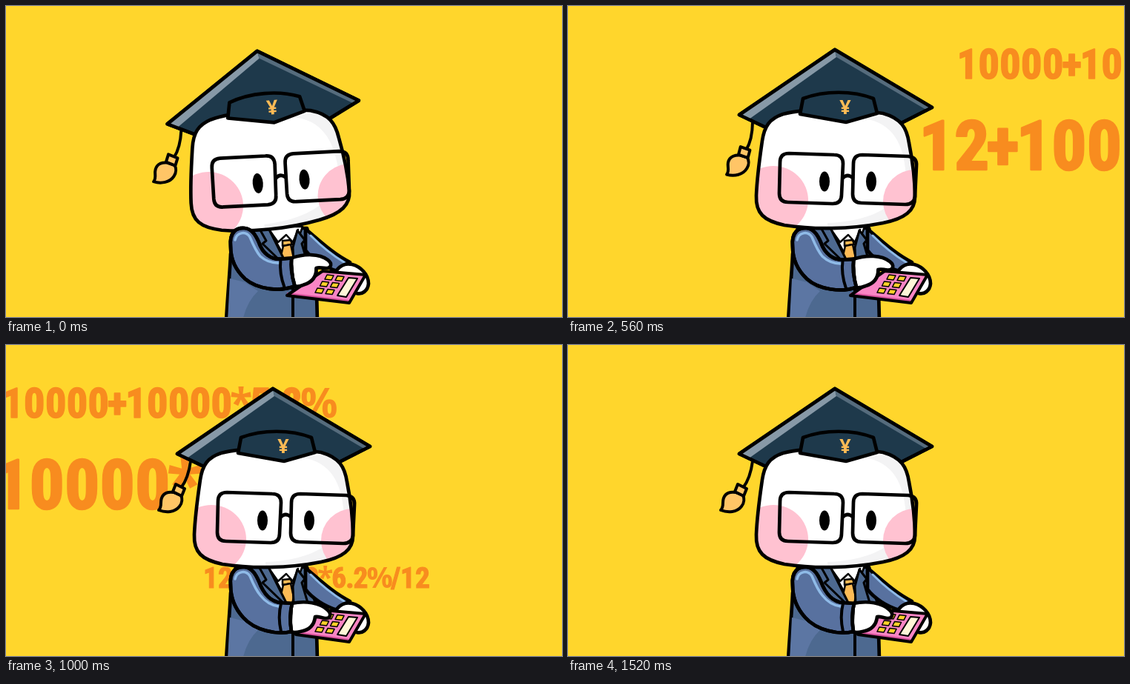
These frames come from a looping animation (750 by 420 pixels, 1.68 s). An HTML page with a canvas:

```html
<!DOCTYPE html>
<html lang="en">
<head>
<meta charset="utf-8">
<title>Scholar with calculator</title>
<style>
html, body { margin: 0; width: 100%; height: 100%; overflow: hidden; background: #ffd62c; }
canvas { display: block; }
</style>
</head>
<body>
<canvas id="stage" width="750" height="420"></canvas>
<script>
const ctx = document.getElementById('stage').getContext('2d');
const LOOP = 1680, STEP = 40, LAST = 1520;
const INK = '#000', COAT = '#4d6990', SLEEVE = '#58719f', COAT_LIGHT = '#5c76a3', SHINE = '#8fbbe8';
const NAVY = '#1e394b', ORANGE = '#fdbb55', PINK = '#ffc2d1';
const DIGITS = '"Roboto Condensed", "Liberation Sans", sans-serif';
const SYMBOLS = '"Open Sans", "Noto Sans", sans-serif';
const rad = deg => deg * Math.PI / 180;
const clamp = v => Math.min(1, Math.max(0, v));
const ease = v => { const s = clamp(v); return s * s * (3 - 2 * s); };

function shape(d, fill, line = 4.7, color = INK) {
  const path = new Path2D(d);
  if (fill) { ctx.fillStyle = fill; ctx.fill(path); }
  if (line) { ctx.lineWidth = line; ctx.strokeStyle = color; ctx.stroke(path); }
}

function oval(x, y, rx, ry, fill) {
  ctx.beginPath();
  ctx.ellipse(x, y, rx, ry, 0, 0, Math.PI * 2);
  ctx.fillStyle = fill;
  ctx.fill();
}

function turned(x, y, deg, draw) {
  ctx.save();
  ctx.translate(x, y);
  ctx.rotate(rad(deg));
  ctx.translate(-x, -y);
  draw();
  ctx.restore();
}

// Each sum glides from `from` by `dist` pixels to the left.
const sums = [
  { text: '10000+10000*5.8%', cap: 40, base: 97.5, from: 882, dist: 1423, start: 0, time: 1720 },
  { text: '12+10000*6.0%', cap: 66, base: 221, from: 914, dist: 1545, start: 0, time: 1600 },
  { text: '12+10000*6.2%/12', cap: 28, base: 327.5, from: 866, dist: 1196, start: 380, time: 1240 }
];
const pitch = { '+': .55, '*': .6, '.': .33, '%': 1.12, '/': .42 };

function drawSum(sum, t) {
  const { cap } = sum;
  let x = sum.from - sum.dist * ease((t - sum.start) / sum.time) - cap * .08;
  ctx.textAlign = 'center';
  ctx.fillStyle = ctx.strokeStyle = '#f88c1f';
  ctx.lineWidth = cap * .04;
  for (const ch of sum.text) {
    const symbol = '*%'.includes(ch), step = (pitch[ch] || .72) * cap;
    ctx.font = `700 ${cap / .712}px ${symbol ? SYMBOLS : DIGITS}`;
    ctx.fillText(ch, x + step / 2, sum.base);
    if (!symbol) ctx.strokeText(ch, x + step / 2, sum.base);
    x += step;
  }
}

function drawBody() {
  shape('M297 426C299 390 302 360 303 335L310 300H406L418 350L420 426Z', COAT);
  shape('M302 368L322 373L340 385Q324 400 319 426H299Z', COAT_LIGHT, 0);
  shape('M387 380V426', null, 4);
  shape('M353 298L382 350L400 298Z', '#fff', 2.5);
  shape('M373 317L384 316L386 322L373 324Z', ORANGE, 2.5);
  shape('M374 324L384 322L388 340L386 350H376L371 337Z', ORANGE, 2.5);
  shape('M355 302L367 319L378 309L387 319L394 302', null, 2.5);
  shape('M342 301L351 317L346 321L374 348L378 348L355 302', COAT, 3);
  shape('M393 303L403 316L399 321L407 348L388 348L387 326Z', COAT, 3);
}

function drawFarArm() {
  shape('M404 301C423 317 443 336 464 346L447 358C430 353 413 342 404 330Z', SLEEVE);
  shape('M411 310C425 324 441 337 456 346', null, 3, SHINE);
  shape('M446 357C451 350 459 347 467 349C478 352 489 362 489 375C488 385 480 390 473 388L450 374Z', '#fff');
}

function drawCalculator(lift) {
  const left = 391 - 12 * lift;
  const outline = `M427 358L485 363L463 401L${left} 391Z`;
  shape(outline, '#f985c4', 0);
  shape(`M${left} 387L462 397L463 402L${left} 391Z`, '#d64f9a', 0);
  shape(outline, null, 4);
  for (let row = 0; row < 3; row++)
    for (let col = 0; col < 2; col++) {
      const x = 436 - row * 6.5 + col * 14, y = 366 + row * 9 + col * 1.6;
      shape(`M${x - 3} ${y - 3}l9 1l-3 6l-9 -1Z`, '#ffcf28', 1.5);
    }
  shape('M462 367L474 368L459 393L447 391Z', '#fff7d8', 2);
}

function drawNearArm(lift) {
  const c = Math.cos(rad(-8 * lift)), s = Math.sin(rad(-8 * lift));
  const bend = d => d.replace(/(\d+) (\d+)/g, (_, x, y) =>
    `${325 + (x - 325) * c - (y - 350) * s} ${350 + (x - 325) * s + (y - 350) * c}`);
  shape(bend('M385 349C404 345 424 348 434 358C440 364 437 370 430 369C424 368 421 366 417 367' +
    'C416 377 410 385 397 387C390 389 386 388 383 387Z'), '#fff');
  const sleeve = 'M303 325C301 304 312 299 322 300C332 301 337 310 341 319' +
    bend('C348 338 359 347 371 348L386 349C383 360 383 374 385 387') +
    bend('C365 392 335 385 320 368') + 'C309 356 303 341 303 325Z';
  shape(sleeve, SLEEVE);
  shape('M309 316C311 306 323 303 329 312C334 324 338 332 343 338' +
    bend('C350 347 358 352 368 353'), null, 3.5, SHINE);
  shape(sleeve, null);
  shape(bend('M371 349C368 361 368 374 371 387'), null, 4);
}

function drawTassel(swing) {
  turned(249, 157, swing, () => {
    shape('M249 157C247 172 243 184 236 193', null, 4);
    shape('M226 199C213 197 209 205 209 213C209 218 208 221 206 223C216 227 228 226 234 218C238 213 238 207 236 203Z', '#ffc566', 4);
    shape('M229 188L241 194L237 204L225 198Z', '#ffc566', 4);
  });
}

function drawHead(t) {
  const skull = 'M290 146C272 152 265 162 262 182C258 210 255 230 254 256C253 280 264 290 292 296' +
    'C330 302 380 302 425 293C455 287 468 276 468 258C468 235 464 205 460 185' +
    'C457 165 450 152 425 145C380 138 320 138 290 146Z';
  const board = 'M360 59L491 137L440 163L275 168L231 147Z';

  shape(board, NAVY);
  shape('M232 147L360 60L362 69L244 153Z', '#8799a7', 0);
  shape('M360 60L490 137L483 140L362 69Z', '#566c7d', 0);
  shape(board, null);

  shape(skull, '#fff', 0);
  ctx.save();
  ctx.clip(new Path2D(skull));
  shape('M400 152C440 158 452 190 455 220C458 255 430 290 350 293V310H480V140Z', '#f3f3f4', 0);
  oval(277, 262, 47, 46, PINK);
  oval(468, 264, 43, 43, PINK);
  ctx.restore();
  shape(skull, null);

  shape('M313 146L317 125C346 114 384 114 412 125L417 145L375 157Z', NAVY);
  ctx.font = `700 27px ${SYMBOLS}`;
  ctx.textAlign = 'center';
  ctx.fillStyle = ORANGE;
  ctx.fillText('¥', 374, 146);

  const open = clamp(Math.abs(t - 160) / 80);
  for (const x of [346, 409]) oval(x, 237 + 2 * (1 - open), 7, Math.max(.6, 13.5 * open), open ? INK : '#555');

  shape('M298 199L359 201Q371 201 371 213L369 255Q369 267 357 267L297 265Q285 265 285 253L286 211Q286 199 298 199Z', null);
  shape('M397 201L459 203Q471 204 470 216L468 257Q467 268 455 268L396 266Q384 266 384 254L385 213Q385 201 397 201Z', null);
  shape('M371 232Q377 226 384 232', null);
}

function render(t) {
  ctx.fillStyle = '#ffd62c';
  ctx.fillRect(0, 0, 750, 420);
  ctx.lineJoin = ctx.lineCap = 'round';
  sums.forEach(sum => drawSum(sum, t));

  const tilt = -4.8 * (1 - ease(t / 320));
  const swing = t < 640 ? -17.7 * Math.sin(Math.PI * t / 640) : 0;
  const lift = 1 - ease(t / 120) + ease(1 - Math.abs(t - 580) / 80);

  drawBody();
  turned(372, 313, tilt, () => {
    drawTassel(swing);
    drawHead(t);
  });
  drawFarArm();
  drawCalculator(lift);
  drawNearArm(lift);
}

const began = performance.now();
function tick() {
  const time = (performance.now() - began) % LOOP;
  render(Math.min(LAST, Math.floor(time / STEP) * STEP));
  requestAnimationFrame(tick);
}
tick();
</script>
</body>
</html>
```
